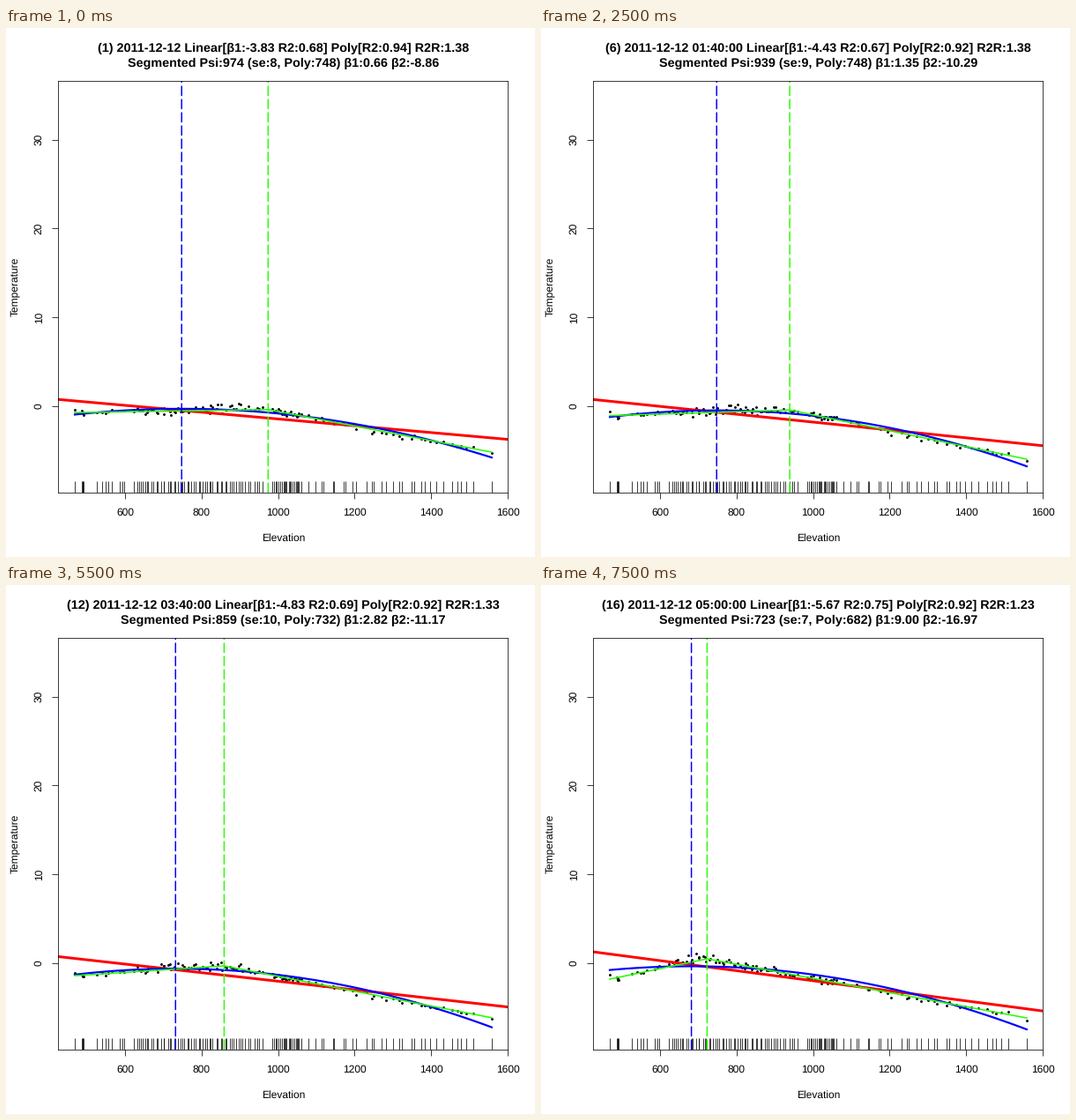
Write a matplotlib script that moves like this. It is 600 px wide and 600 px high and loops after 8 s.

```python
import numpy as np
import matplotlib.pyplot as plt
from matplotlib.animation import FuncAnimation

SIZE, DPI = 600, 100
FRAMES, INTERVAL = 16, 500
PX = 72 / DPI
LEFT, RIGHT, TOP, BOTTOM = 59.04, 569.4, 59.6, 526.56
MID = 314.4
X_SCALE, Y_SCALE = 0.434, 10.067
FIRST, LAST = 468.7, 1558.2
GREEN, BLUE, RED = "#26ff00", "#0000ff", "#ff0000"

plt.rcParams.update({"font.family": "Liberation Sans", "text.hinting": "none"})


def to_px(x, y):
    return 135 + (x - 600) * X_SCALE, 428.7 - y * Y_SCALE


def to_data(px, py):
    return 600 + (px - 135) / X_SCALE, (428.7 - py) / Y_SCALE


X0, Y0 = to_data(LEFT, BOTTOM)
X1, Y1 = to_data(RIGHT, TOP)

# Readings at key steps: slope, linear R2, psi, its error, apex, b1, b2
KEYS = {
    0: (-3.83, 0.680, 974, 8, 748, 0.66, -8.86),
    3: (-4.51, 0.659, 916, 9, 755, 1.97, -10.85),
    5: (-4.43, 0.666, 939, 9, 748, 1.35, -10.29),
    8: (-4.43, 0.666, 939, 11, 746, 1.25, -10.12),
    11: (-4.83, 0.690, 859, 10, 732, 2.82, -11.17),
    12: (-5.04, 0.694, 819, 9, 724, 4.24, -12.49),
    15: (-5.67, 0.747, 723, 7, 682, 9.00, -16.97),
}

rng = np.random.default_rng(5)


def band(lo, hi, n):
    """Evenly spread stations with a little jitter."""
    return lo + (hi - lo) * (np.arange(n) + rng.random(n)) / n


ELEV = np.concatenate([
    [FIRST, LAST], band(484, 494, 4), band(526, 606, 8), band(620, 910, 50),
    band(912, 962, 7), band(984, 1062, 21), band(1070, 1515, 30)])
N = len(ELEV)
LOW = ELEV < 910
OFFSET = rng.normal(0, 1, N).clip(-2, 2) * np.where(LOW, 0.22, 0.14)
PHASE = rng.uniform(0, 2 * np.pi, N)
WARMTH = np.abs(rng.normal(0, 1, N)).clip(0, 1.8)
DIP = np.where(np.abs(ELEV - 1250) < 70, 0.9 * rng.random(N) ** 2, 0)


def readings(i):
    return [np.interp(i, list(KEYS), col) for col in zip(*KEYS.values())]


def segmented(x, i, psi, b1, b2):
    end = -6.2 + np.exp(-i / 3.2)
    knee = end - (b1 + b2) * (LAST - psi) / 1000
    d = (x - psi) / 1000
    return knee + b1 * d + b2 * np.maximum(d, 0)


def scatter(i):
    """Station noise, with a warm spell drifting to lower ground."""
    warm = 0.42 * WARMTH * np.exp(-((ELEV - 850 + 12 * i) / 60) ** 2)
    return OFFSET + 0.1 * np.cos(PHASE + 0.7 * i) + warm - DIP


fig = plt.figure(figsize=(SIZE / DPI, SIZE / DPI), dpi=DPI, facecolor="white")
ax = fig.add_axes([LEFT / SIZE, 1 - BOTTOM / SIZE,
                   (RIGHT - LEFT) / SIZE, (BOTTOM - TOP) / SIZE])
ax.set(xlim=(X0, X1), ylim=(Y0, Y1),
       xticks=range(600, 1601, 200), yticks=range(0, 31, 10))
ax.tick_params(length=7.2 * PX, width=0.75 * PX,
               labelbottom=False, labelleft=False)
for spine in ax.spines.values():
    spine.set_linewidth(0.75 * PX)


def label(x, y, s="", size=12, **kw):
    return fig.text(x / SIZE, 1 - y / SIZE, s, fontsize=size * PX,
                    ha="center", va="baseline", **kw)


def side_label(x, y, s):
    fig.text(x / SIZE, 1 - y / SIZE, s, fontsize=12 * PX, rotation=90,
             ha="right", va="center")


title = [label(MID, y, size=14.4, weight="bold") for y in (27, 44.2)]
for e in range(600, 1601, 200):
    label(to_px(e, 0)[0], 553, str(e))
for t in range(0, 31, 10):
    side_label(43, to_px(0, t)[1], str(t))
label(MID, 582, "Elevation")
side_label(15.5, 293, "Temperature")


def line(color, width, **kw):
    return ax.plot([], [], color=color, lw=width * PX, **kw)[0]


ax.vlines(ELEV, Y0, Y0 + 12.6 / Y_SCALE, color="black", lw=0.75 * PX, zorder=2)
dots = line("black", 0, ls="", marker="o", ms=2.9 * PX, mew=0)
red = line(RED, 3)
blue = line(BLUE, 2.2)
green = line(GREEN, 1.6)
dash = dict(ls=(0, (7, 3)), dash_capstyle="round", snap=False)
apex_line = line(BLUE, 1.5, **dash)
psi_line = line(GREEN, 1.5, **dash)
curve_x = np.linspace(FIRST, LAST, 120)


def draw(i):
    slope, lin_r2, psi, se, apex, b1, b2 = readings(i)
    poly_r2 = 0.917 + 0.023 * np.exp(-i / 2)
    clock = f" {i // 3:02d}:{i % 3 * 20:02d}:00" if i else ""
    title[0].set_text(
        f"({i + 1}) 2011-12-12{clock} Linear[β1:{slope:.2f} R2:{lin_r2:.2f}] "
        f"Poly[R2:{poly_r2:.2f}] R2R:{poly_r2 / lin_r2:.2f}")
    title[1].set_text(
        f"Segmented Psi:{psi:.0f} (se:{se:.0f}, Poly:{apex:.0f}) "
        f"β1:{b1:.2f} β2:{b2:.2f}")

    temps = segmented(ELEV, i, psi, b1, b2) + scatter(i)
    dots.set_data(ELEV, temps)

    # Both fits go through the data: the line by its mean, the parabola by
    # least squares around its apex.
    ends = np.array([X0, X1])
    red.set_data(ends, temps.mean() + slope * (ends - ELEV.mean()) / 1000)
    bend = np.polyfit((ELEV - apex) ** 2, temps, 1)
    blue.set_data(curve_x, np.polyval(bend, (curve_x - apex) ** 2))

    knots = np.array([FIRST, psi, LAST])
    green.set_data(knots, segmented(knots, i, psi, b1, b2))
    apex_line.set_data([apex] * 2, [Y0, Y1])
    psi_line.set_data([psi] * 2, [Y0, Y1])
    return [*title, dots, red, blue, green, apex_line, psi_line]


anim = FuncAnimation(fig, draw, frames=FRAMES, interval=INTERVAL,
                     init_func=lambda: draw(0), repeat=True, repeat_delay=0)
plt.show()
```
